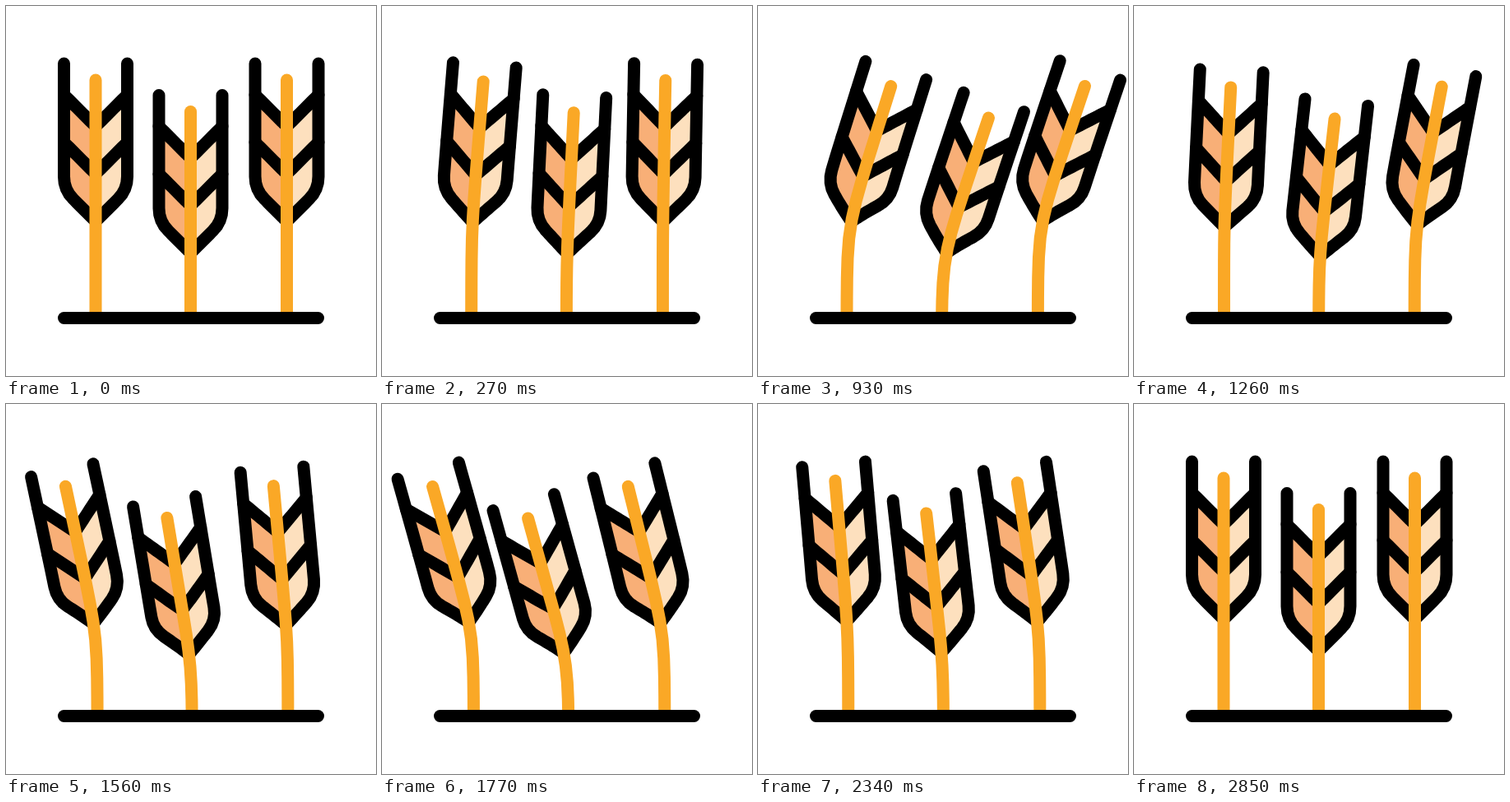
Animation, 450 px wide and 450 px high, one loop 3600 ms. Source, as an HTML page with a canvas:

```html
<!DOCTYPE html>
<html lang="en">
<head>
<meta charset="utf-8">
<title>Swaying wheat</title>
<style>
html, body { margin: 0; width: 100%; height: 100%; overflow: hidden; background: #fff; }
canvas { display: block; }
</style>
</head>
<body>
<canvas id="stage" width="450" height="450"></canvas>
<script>
const ctx = document.getElementById('stage').getContext('2d');
const LOOP = 3600, STEP = 30, GROUND = 379.5;
const HALF = 38.5; // half the width of an ear
const BEND = 181, SOFT = 22, RECOIL = 0.033, BUCKLE = 0.09;

const stalks = [
  { x: 109, top: 90, delay: 0 },
  { x: 224.5, top: 128.5, delay: 65 },
  { x: 341.5, top: 90, delay: 150 }
];

// Offsets of the tip: upright, right, left, upright
const keys = [
  { t: 0, x: 0, y: 0 },
  { t: 825, x: 56.5, y: 7.5 },
  { t: 1745, x: -47.5, y: 10.5 },
  { t: 2700, x: 0, y: 0 }
];

// Right half of an ear: x from the axis, d down from the tip
const corner = [0, 0.25, 0.5, 0.75, 1].map(u => [
  HALF - 11.3 * u * u,
  117.5 + 32 * u * (1 - u) + 27.3 * u * u
]);
const outline = [[HALF, -20], ...corner, [0, 172]];
const chevrons = [18, 75.75].map(d => [[HALF, d], [0, d + HALF]]);
const body = [...chevrons[0].slice().reverse(), ...corner, [0, 172]];

function tipAt(t) {
  const i = keys.findIndex(k => t < k.t);
  if (i < 1) return { x: 0, y: 0 };
  const a = keys[i - 1], b = keys[i];
  const u = (t - a.t) / (b.t - a.t), e = u * u * (3 - 2 * u);
  return { x: a.x + (b.x - a.x) * e, y: a.y + (b.y - a.y) * e };
}

// Maps a point of the upright stalk onto the bent one
function bender({ x: x0, top }, tip) {
  const gain = (1 + RECOIL) / BEND;
  const tilt = 1 - Math.cos(Math.atan(tip.x * gain));
  return ([x, d]) => {
    const e = Math.exp((BEND - d) / SOFT);
    const sway = gain * SOFT * Math.log(1 + e) - RECOIL;
    const bulge = tip.y * BUCKLE / (1 + e);
    const angle = Math.atan(tip.x * gain * e / (1 + e));
    const drop = (tip.y - tilt * d) * Math.min(1, (GROUND - top - d) / 150);
    return [
      x0 + tip.x * sway + bulge + x * Math.cos(angle),
      top + d + drop + x * Math.sin(angle)
    ];
  };
}

function trace(points, bend) {
  const n = 12;
  ctx.beginPath();
  ctx.lineTo(...bend(points[0]));
  for (let i = 1; i < points.length; i++) {
    const [ax, ad] = points[i - 1], [bx, bd] = points[i];
    for (let j = 1; j <= n; j++) {
      ctx.lineTo(...bend([ax + (bx - ax) * j / n, ad + (bd - ad) * j / n]));
    }
  }
}

function stroke(points, color, bend = p => p) {
  trace(points, bend);
  ctx.strokeStyle = color;
  ctx.stroke();
}

function drawStalk(stalk, t) {
  const bend = bender(stalk, tipAt(t - stalk.delay));
  const sides = [-1, 1].map(s => ({
    color: s < 0 ? '#f8af77' : '#fde0be',
    flip: ([x, d]) => bend([s * x, d])
  }));
  for (const { color, flip } of sides) {
    trace(body, flip);
    ctx.fillStyle = color;
    ctx.fill();
  }
  for (const { flip } of sides) {
    for (const line of [outline, ...chevrons]) stroke(line, '#000', flip);
  }
  stroke([[0, 0], [0, GROUND - stalk.top]], '#faa826', bend);
}

function frame(now) {
  const t = Math.floor(now % LOOP / STEP) * STEP;
  ctx.fillStyle = '#fff';
  ctx.fillRect(0, 0, 450, 450);
  ctx.lineWidth = 15;
  ctx.lineCap = ctx.lineJoin = 'round';
  for (const stalk of stalks) drawStalk(stalk, t);
  stroke([[70.5, GROUND], [379.5, GROUND]], '#000');
}

const start = performance.now();
function tick() {
  frame(performance.now() - start);
  requestAnimationFrame(tick);
}
tick();
</script>
</body>
</html>
```
